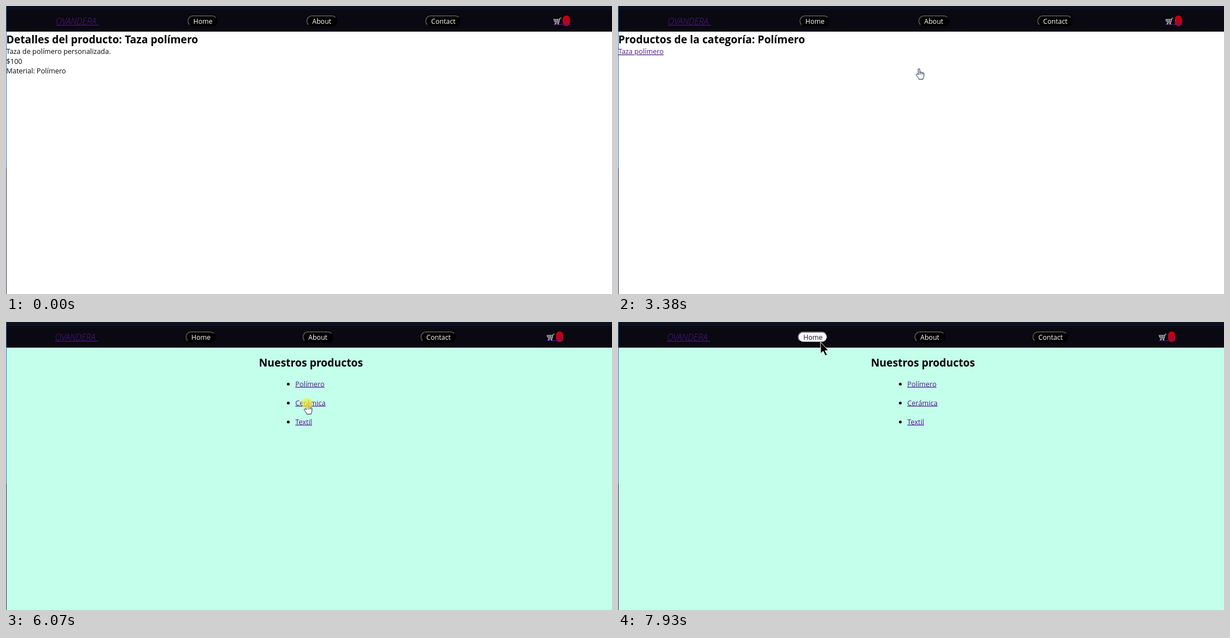
An HTML page that plays this animation: 1083x517 px, repeating every 8000 ms.

```html
<!DOCTYPE html>
<html lang="es">
<head>
<meta charset="utf-8">
<title>Tienda</title>
<style>
  html, body { margin: 0; width: 100%; height: 100%; overflow: hidden; background: #fff; }
  svg { display: block; width: 100vw; height: 100vh; }
  text { font: 12.45px "Open Sans", "Noto Sans", sans-serif; fill: #0a0a0a; white-space: pre; }
  .title { font-size: 18.9px; font-weight: 700; fill: #000; }
  .link { fill: #551a8b; text-decoration: underline; }
  .brand { font-size: 15.6px; font-weight: 300; font-style: italic; fill: #551a8b; }
  .label { font-size: 12.1px; fill: #fff; }
  .face { fill: #000; stroke: #000; stroke-width: 1.5; }
  .edge { fill: none; stroke: #5e5e62; stroke-width: 1.5; }
  .hover .face { fill: #f8f8ff; }
  .hover .label { fill: #16161c; }
</style>
</head>
<body>
<svg id="stage" viewBox="0 0 1083 517" preserveAspectRatio="none"></svg>
<script>
const LOOP = 8000, STEP = 70;
const KINDS = ['Polímero', 'Cerámica', 'Textil'];
const stage = document.getElementById('stage');
const byId = id => document.getElementById(id);

// ---- drawing ----
const text = (x, y, s, cls = '') => `<text x="${x}" y="${y}" class="${cls}">${s}</text>`;
const rect = (x, y, w, h, fill, more = '') =>
  `<rect x="${x}" y="${y}" width="${w}" height="${h}" fill="${fill}" ${more}/>`;
const group = (id, body) => `<g id="${id}" visibility="hidden">${body}</g>`;

function button(x, w, name) {
  const r = x + w;
  return `<g class="btn-${name}">` +
    rect(x + .75, 17.75, w - 1.5, 18.5, '#000', 'rx="9" class="face"') +
    `<path class="edge" d="M${x + 3.4} 33.6A9 9 0 0 1 ${x + .75} 27.2V26.8A9 9 0 0 1 ${x + 9.75} 17.75` +
    `H${r - 9.75}A9 9 0 0 1 ${r - 3.4} 20.4"/>` + text(x + 10.3, 31.5, name, 'label') + '</g>';
}

function cart(x) {
  return `<g transform="translate(${x} 21)" fill="none" stroke="#dcdcdc">
    <path d="M14.3 .8H12L9.8 9.3H3M11.3 3H.8L2.4 7.2H10.2"/>
    <path d="M1.5 5H10.8M4 3L4.8 7M7.5 3L7.4 7" stroke-width=".7"/>
    <circle cx="3.8" cy="11.2" r=".9"/><circle cx="9" cy="11.2" r=".9"/></g>` +
    rect(x + 17, 17, 13, 19, '#c4000c', 'rx="6.5"') +
    `<text x="${x + 23.5}" y="31.5" text-anchor="middle" style="fill:#551a8b">0</text>` +
    rect(x, 33, 30, 1, '#551a8b');
}

const nav = (brand, home, about, contact, basket) =>
  text(brand, 33, 'OVANDERA', 'brand') + rect(brand, 34, 77, 1, '#551a8b') +
  button(home, 53.5, 'Home') + button(about, 55, 'About') +
  button(contact, 63, 'Contact') + cart(basket);

const category = kind =>
  text(.5, 67, `Productos de la categoría: ${kind}`, 'title') +
  text(.5, 86, `Taza ${kind.toLowerCase()}`, 'link');

function detail(kind) {
  const low = kind.toLowerCase();
  const lines = [`Taza de ${low} personalizada.`, '$100', `Material: ${kind}`];
  return text(.5, 67, `Detalles del producto: Taza ${low}`, 'title') +
    lines.map((s, i) => text(.5, 86.2 + 17.5 * i, s)).join('');
}

const home = rect(0, 45, 1083, 472, '#c4ffeb') +
  text(452, 79.5, 'Nuestros productos', 'title') +
  KINDS.map((k, i) => `<circle cx="504.5" cy="${111.5 + 34 * i}" r="2.5"/>` +
    text(517, 115.5 + 34 * i, k, 'link')).join('');

const inner = [0, 1].map(k =>
  group('category' + k, category(KINDS[k])) + group('detail' + k, detail(KINDS[k]))).join('');

stage.innerHTML =
  rect(0, 0, 1083, 517, '#fff') + group('home', home) + inner +
  rect(0, 0, 1083, 46, '#0a0811') + rect(0, 0, 1083, 7, '#0c101f') +
  group('navHome', nav(87.5, 321, 530, 741, 966)) +
  group('navWide', nav(89, 324.5, 537, 749.5, 978)) +
  rect(0, 0, 1, 290, '#2079c4') + rect(0, 290, 1, 227, '#2a2a44') +
  group('arrow', `<path d="M0 0V20.5L4.6 16.4L8.4 24.4L11.8 22.9L8 15.2H14Z" stroke="#fff"/>`) +
  group('hand', `<path d="M-1.5 11.5V2C-1.5 .1 1.4 .1 1.4 2V7.2C1.6 5.9 4 6.1 4 7.6C4.5 6.4 6.5 6.7 6.5 8.2
    C7.2 7.3 8.8 7.8 8.8 9.2V13.5C8.8 16 7.2 17 7.2 19.4H-.4C-.6 17.2 -3 15 -4.8 12.4
    C-6 10.6 -4 9.2 -2.7 10.4Z" fill="#fff" stroke="#15183a" stroke-linejoin="round"/>
    <path d="M1.4 7V11M4 7.6V11M6.5 8.2V11" fill="none" stroke="#15183a" stroke-width=".9"/>`) +
  group('click', '<circle r="9.7" fill="#f4ee30" fill-opacity=".7"/>');

// ---- visit: Home, then a category, then its product, over and over ----
const spots = [
  () => [345, 26],
  kind => [538, 112 + 34 * kind],
  () => [63, 79]
];
const HOME_REST = [362, 36];
const ENTER = { to: [1018, 505], link: false };

// click time and the pause before the pointer leaves
const clicks = [[2090, 490], [3310, 140], [4200, 330], [5300, 140], [6060, 140], [6900, 140], [7790, 210]];

const legs = [];
const go = (start, end, to, link = false) => legs.push({ start, end, to, link });

go(330, 1110, [670, 429]);
go(1110, 1390, [348, 165]);
go(1390, 1670, [183, 58]);
let leave = 1670;
clicks.forEach(([click, pause], i) => {
  const spot = i % 3;
  go(leave, click - 2 * STEP, spots[spot](Math.floor(i / 3)), spot > 0);
  if (spot === 0) go(click + STEP, click + 2 * STEP, HOME_REST);
  leave = click + pause;
});

const smooth = p => p * p * (3 - 2 * p);

// The pointer advances in whole steps along the current leg.
function pointer(t) {
  const i = Math.max(0, legs.findLastIndex(leg => leg.start <= t));
  const leg = legs[i], from = legs[i - 1] || ENTER;
  const passed = Math.max(0, Math.floor((t - leg.start) / STEP) * STEP);
  const p = smooth(Math.min(1, passed / (leg.end - leg.start)));
  const [x, y] = leg.to.map((v, k) => from.to[k] + (v - from.to[k]) * p);
  const hand = [from, leg].some(s => s.link && Math.hypot(x - s.to[0], y - s.to[1]) < 20);
  return { x, y, hand };
}

function pageAt(t) {
  const done = clicks.filter(([click]) => t >= click + STEP).length;
  const kind = Math.max(0, Math.floor((done - 1) / 3));
  return done % 3 === 1 ? 'home' : (done % 3 === 2 ? 'category' : 'detail') + kind;
}

const show = (id, on) => byId(id).setAttribute('visibility', on ? 'visible' : 'hidden');
const homeButtons = stage.querySelectorAll('.btn-Home');

function draw(t) {
  const page = pageAt(t);
  for (const id of ['home', 'category0', 'detail0', 'category1', 'detail1']) show(id, id === page);
  show('navHome', page === 'home');
  show('navWide', page !== 'home');

  const { x, y, hand } = pointer(t);
  const over = x > 321 && x < 378 && y > 17 && y < 38;
  homeButtons.forEach(b => b.classList.toggle('hover', over));
  show('arrow', t >= legs[0].start && !hand);
  show('hand', hand);
  show('click', clicks.some(([click]) => t >= click && t < click + STEP));
  for (const id of ['arrow', 'hand', 'click'])
    byId(id).setAttribute('transform', `translate(${x.toFixed(1)} ${y.toFixed(1)})`);
}

const start = performance.now();
function tick() {
  draw((performance.now() - start) % LOOP);
  requestAnimationFrame(tick);
}
tick();
</script>
</body>
</html>
```
